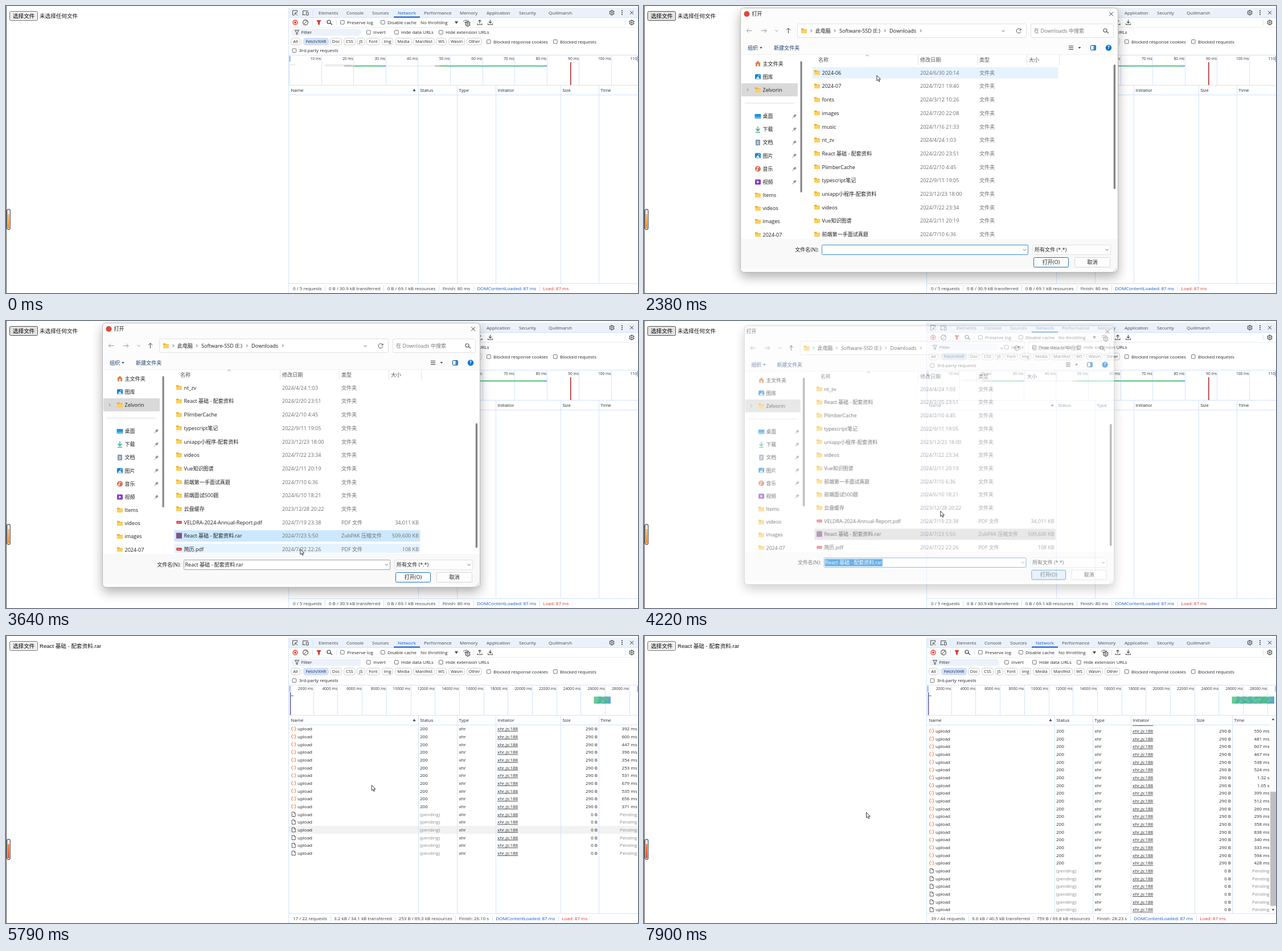
Recreate the animation shown at these times as an HTML page with a canvas. Size 1110 by 505 pixels, loop 7.99 s.

```html
<!DOCTYPE html>
<html lang="zh">
<head>
<meta charset="utf-8">
<style>
html, body { margin: 0; width: 100%; height: 100%; overflow: hidden; background: #fff; }
canvas { display: block; }
</style>
</head>
<body>
<canvas id="stage" width="1110" height="505"></canvas>
<script>
const W = 1110, H = 505, LOOP = 7990;
const UI = '"Open Sans", "Noto Sans CJK SC", "Noto Sans CJK", sans-serif';
const PAGE = '"Liberation Sans", "Noto Sans CJK SC", "Noto Sans CJK", sans-serif';
const stage = document.getElementById('stage').getContext('2d');
const layer = Object.assign(document.createElement('canvas'), { width: W, height: H }).getContext('2d');
let c = stage;

// ---------- drawing helpers ----------
function text(s, x, y, { size = 8, color = '#27282b', align = 'left', font = UI, weight = 400 } = {}) {
  c.font = `${weight} ${size}px ${font}`;
  c.fillStyle = color;
  c.textAlign = align;
  c.fillText(s, x, y + size * 0.36);
  return c.measureText(s).width;
}
function rect(x, y, w, h, color) { c.fillStyle = color; c.fillRect(x, y, w, h); }
function box(x, y, w, h, r, fill, stroke, lw = 1) {
  c.beginPath();
  c.roundRect(x, y, w, h, r);
  if (fill) { c.fillStyle = fill; c.fill(); }
  if (stroke) { c.strokeStyle = stroke; c.lineWidth = lw; c.stroke(); }
}
function circle(x, y, r, fill, stroke, lw = 1) {
  c.beginPath();
  c.arc(x, y, r, 0, Math.PI * 2);
  if (fill) { c.fillStyle = fill; c.fill(); }
  if (stroke) { c.strokeStyle = stroke; c.lineWidth = lw; c.stroke(); }
}
function path(d, x, y, { fill, stroke, lw = 1 } = {}) {
  const p = new Path2D(d);
  c.save();
  c.translate(x, y);
  if (fill) { c.fillStyle = fill; c.fill(p); }
  if (stroke) { c.strokeStyle = stroke; c.lineWidth = lw; c.stroke(p); }
  c.restore();
}
const line = (d, x, y, stroke = '#474747', lw = 1) => path(d, x, y, { stroke, lw });
const solid = (d, x, y, fill = '#474747') => path(d, x, y, { fill });
const vline = (x, y1, y2, color = '#d3e3fd') => rect(x, y1, 1, y2 - y1, color);
const hline = (x1, x2, y, color = '#d3e3fd') => rect(x1, y, x2 - x1, 1, color);
const magnifier = (x, y, col) => line('M2 0A3 3 0 1 1-4 0A3 3 0 1 1 2 0M1.5 2L5 5', x, y - 1, col, 1.1);
const chevron = (x, y, col = '#555') => line('M-2.5-1.2L0 1.2L2.5-1.2', x, y, col, 0.9);

// ---------- upload queue: six requests at a time ----------
const START = 4650, SLOTS = 6, ROW = 13.67, ROWS_TOP = 156.5, ROWS_BOTTOM = 488.3;
const durations = ('392 600 447 396 354 253 531 679 535 656 371 737 621 721 508 550 481 607 467 538 524 ' +
  '1320 1050 399 512 260 299 358 838 340 333 594 428 900 900 900 900 900 900').split(' ').map(Number);
const free = Array(SLOTS).fill(0);
const requests = durations.map(dur => {
  const slot = free.indexOf(Math.min(...free));
  const begin = free[slot];
  free[slot] += dur;
  return { begin, dur, end: begin + dur, slot };
});

// ---------- pointer ----------
const route = [[30, 752, 0], [300, 430, 62], [790, 36, 14], [930, 36, 14], [1320, 410, 95], [2350, 410, 95],
  [2540, 400, 258], [2860, 400, 258], [3000, 401, 336], [3220, 404, 374], [3360, 404, 374], [4130, 712, 448],
  [4219, 712, 448], [4220, 520, 334], [4710, 640, 338], [5690, 640, 338], [5790, 642, 262], [6470, 430, 300],
  [6770, 390, 310]];
function pointer(t) {
  const i = route.findIndex(k => k[0] > t);
  if (i < 0) return route.at(-1).slice(1);
  if (i === 0) return [-50, -50];
  const [t0, x0, y0] = route[i - 1], [t1, x1, y1] = route[i];
  const u = (t - t0) / (t1 - t0);
  return [x0 + (x1 - x0) * u, y0 + (y1 - y0) * u];
}
function drawPointer(t) {
  const [x, y] = pointer(t);
  path('M0 0V9.4L2.2 7.4L3.8 10.8L5.3 10.1L3.8 6.8H6.7Z', x + 0.5, y + 0.5, { fill: '#fff', stroke: '#222', lw: 0.9 });
  if (t >= 1790 && t < 2300) {
    circle(x + 8, y + 0.5, 3.2, '#fff', '#1c86d6', 2.2);
    const a = t / 160;
    c.beginPath();
    c.arc(x + 8, y + 0.5, 3.2, a, a + 1.2);
    c.strokeStyle = '#5fb4ee';
    c.stroke();
  }
}

// ---------- left page ----------
function drawPage(t) {
  rect(0, 0, 1, H, '#5c5c5c');
  const hover = t > 700 && t < 4420, pressed = t >= 900 && t < 1000;
  box(6.5, 9.5, 49, 16, 2, pressed ? '#f5f5f5' : hover ? '#e3e3e3' : '#efefef', hover ? '#4f4f4f' : '#767676');
  text('选择文件', 12, 17.3, { size: 9.6, font: PAGE, color: '#000' });
  text(t < 4420 ? '未选择任何文件' : 'React 基础 - 配套资料.rar', 59, 17.3, { size: 9.6, font: PAGE, color: '#111' });
  box(1.7, 357.7, 5.6, 35.6, 2.8, '#fff', '#555', 1.3);
  const late = t >= 5690;
  const g = c.createLinearGradient(0, 364, 0, 392);
  g.addColorStop(0, late ? '#f0905c' : '#f6c48c');
  g.addColorStop(1, late ? '#ea4a22' : '#ef8a2c');
  rect(3, 366, 3, 25, g);
}

// ---------- network panel ----------
function gear(x, y) {
  circle(x, y, 3.6, null, '#474747', 1.1);
  circle(x, y, 1.3, null, '#474747', 1);
  for (let i = 0; i < 6; i++) {
    const a = i * Math.PI / 3 + Math.PI / 6;
    circle(x + 4.2 * Math.cos(a), y + 4.2 * Math.sin(a), 0.8, '#474747');
  }
}
function check(x, y, label) {
  box(x + 0.5, y - 3.3, 6.6, 6.6, 1, '#fff', '#5f6368', 0.9);
  text(label, x + 12, y);
}
const funnel = (x, y, col, fill) => path('M-3.5-3.5H3.5L1 0V3.5H-1V0Z', x, y, { stroke: col, fill, lw: 1 });

function drawToolbars() {
  rect(497, 3, 613, 17, '#eaf1fb');
  hline(497, W, 20);
  hline(497, W, 37, '#e4ecf9');
  vline(496, 3, H);
  line('M-1 4H-4V-4H4V-1M0 0L4.5 4.5M0 3.5V0H3.5', 507.5, 12);
  line('M-4.5 3.5V-3.5H4.5M-5.5 3.5H0M1.5-1H5V4H1.5Z', 526, 12);
  vline(538, 7, 17);
  const tabs = { Elements: 549, Console: 598, Sources: 643, Network: 688, Performance: 734, Memory: 797,
    Application: 844, Security: 901, Quillmarsh: 953 };
  for (const [name, x] of Object.entries(tabs)) {
    text(name, x, 11.7, { color: name === 'Network' ? '#0b57d0' : '#474747' });
  }
  rect(681, 18.5, 46, 2, '#0b57d0');
  gear(1064, 11.7);
  for (const y of [8.3, 11.5, 14.7]) circle(1082, y, 1, '#333');
  line('M-3-3L3 3M3-3L-3 3', 1099, 11.7, '#333');

  circle(508, 29, 4, null, '#dc362e', 1.3);
  rect(506.3, 27.3, 3.4, 3.4, '#dc362e');
  circle(526, 29, 4.4, null, '#474747', 1.1);
  line('M-3 3L3-3', 526, 29);
  vline(538, 24, 34);
  funnel(549.5, 29, '#dc362e', '#dc362e');
  magnifier(568, 29, '#333');
  vline(580, 24, 34);
  check(587, 28.7, 'Preserve log');
  check(658, 28.7, 'Disable cache');
  text('No throttling', 728, 28.7);
  solid('M-3-2H3L0 2.5Z', 791, 29);
  line('M-5-1.5Q0-5.5 5-1.5M-3 .8Q0-1.8 3 .8', 808, 28.5);
  gear(811, 31.5);
  vline(821, 24, 34);
  line('M0 2V-4M-2.5-1.5L0-4L2.5-1.5M-4 2V4H4V2', 832, 28.7, '#474747', 1.1);
  line('M0-4.5V1.5M-2.5-1L0 1.5L2.5-1M-4 2V4H4V2', 850.5, 28.7, '#474747', 1.1);
  vline(1087, 24, 34);
  gear(1099, 29);

  box(501, 40, 123, 12.5, 6, '#edf2fa');
  funnel(511, 46.3, '#474747');
  text('Filter', 518.5, 46.3);
  check(633, 46.2, 'Invert');
  check(682, 46.2, 'Hide data URLs');
  check(760, 46.2, 'Hide extension URLs');

  const chips = { All: [500, 517], 'Fetch/XHR': [522, 567], Doc: [569, 590], CSS: [593, 614], JS: [616, 631],
    Font: [633, 657], Img: [660, 680], Media: [683, 713], Manifest: [715, 753], WS: [755, 774],
    Wasm: [777, 806], Other: [809, 836] };
  for (const [name, [a, b]] of Object.entries(chips)) {
    const on = name === 'Fetch/XHR';
    box(a + 0.5, 56.5, b - a - 1, 12, 4, on ? '#d3e3fd' : '#fff', on ? '#c4d9fb' : '#c7c7c7', 0.9);
    text(name, (a + b) / 2, 62.7, { size: 7.4, align: 'center', weight: 500 });
  }
  vline(519, 58, 68);
  check(844, 62.7, 'Blocked response cookies');
  check(961, 62.7, 'Blocked requests');
  check(502.5, 78.3, '3rd-party requests');
}

function drawOverview(t) {
  const live = t >= START;
  hline(497, W, 86);
  hline(497, W, 139);
  const pitch = live ? 42.7 : 56.6, unit = live ? 2000 : 10;
  for (let i = 0; i < 15; i++) {
    const x = 497.5 + i * pitch;
    vline(Math.round(x - 0.5), 87, 139);
    if (i) text(`${i * unit} ms`, x - 1, 93, { size: 6.7, align: 'right', color: '#333' });
  }
  rect(497, 88, 3, 10, '#a8c7fa');
  rect(1108, 88, 2, 10, '#a8c7fa');
  if (!live) {
    rect(499, 103, 9, 1, '#dcdcdc');
    rect(560, 103, 47, 1, '#dcdcdc');
    rect(560, 105, 193, 1, '#dedede');
    rect(594, 104.5, 18, 2, '#b3b3b3');
    rect(612, 104.5, 49, 2, '#4cc27a');
    rect(661, 104.5, 6, 2, '#5b9bf0');
    rect(753, 104.5, 8, 2, '#b3b3b3');
    rect(761, 104.5, 183, 2, '#4cc27a');
    rect(944, 104.5, 6, 2, '#5b9bf0');
    rect(991, 99, 1.6, 40, '#ab2a30');
    return;
  }
  rect(499, 104.5, 6, 1.5, '#6aa4ee');
  rect(499, 99, 1.3, 40, '#4a4a8c');
  const now = t - START, px = ms => 1032.5 + ms * 0.02135;
  for (const r of requests) {
    if (r.begin > now) continue;
    const a = px(r.begin), b = px(Math.min(r.end, now)) + 5;
    const y = 106.8 + r.slot * 2.05;
    rect(a, y, b - a, 1.7, '#45bf7c');
    rect(a + (b - a) * 0.55, y, (b - a) * 0.45, 1.7, '#5a98e6');
  }
}

function drawTable(t) {
  const now = t - START;
  const shown = requests.filter(r => r.begin <= now);
  const total = shown.length * ROW, view = ROWS_BOTTOM - ROWS_TOP;
  const bar = total > view;
  const cols = bar ? [497, 721, 788, 855, 967, 1033, 1100] : [497, 724, 792, 860, 974, 1041, 1110];
  const scroll = Math.max(0, total - view);
  const [mx, my] = pointer(t - 130);

  c.save();
  c.beginPath();
  c.rect(497, 157, 613, 331);
  c.clip();
  shown.forEach((r, i) => {
    const top = ROWS_TOP + i * ROW - scroll, y = top + ROW / 2;
    if (top < 140) return;
    const done = r.end <= now, tone = { color: done ? '#27282b' : '#8a8a8a' };
    if (mx > 497 && my >= top && my < top + ROW) rect(497, top, cols[6] - 497, ROW, '#f2f2f2');
    if (done) {
      line('M-1.5-3.5Q-3-3.5-3-2Q-3 0-4 0Q-3 0-3 2Q-3 3.5-1.5 3.5M1.5-3.5Q3-3.5 3-2Q3 0 4 0Q3 0 3 2Q3 3.5 1.5 3.5M0-2V-1M0 1V2',
        505.2, y, '#e8703a', 1);
    } else {
      line('M-3-3.8H1L3-1.8V3.8H-3ZM1-3.8V-1.8H3', 505.2, y, '#474747', 0.9);
    }
    text('upload', 512, y);
    text(done ? '200' : '(pending)', cols[1] + 3, y, tone);
    text('xhr', cols[2] + 3.5, y);
    const w = text('xhr.js:188', cols[3] + 3, y);
    rect(cols[3] + 3, y + 4, w, 0.8, '#27282b');
    text(done ? '290 B' : '0 B', cols[5] - 2, y, { align: 'right' });
    const time = r.dur < 1000 ? `${r.dur} ms` : `${(r.dur / 1000).toFixed(2)} s`;
    text(done ? time : 'Pending', cols[6] - 1.5, y, { ...tone, align: 'right' });
  });
  c.restore();

  ['Name', 'Status', 'Type', 'Initiator', 'Size', 'Time'].forEach((name, i) => {
    text(name, cols[i] + 3.2, 148);
    if (i) vline(cols[i], 139, 488);
  });
  solid('M-2.5 2L0-2.5L2.5 2Z', cols[1] - 7, 148);
  hline(497, W, 156);
  if (bar) {
    rect(1100, 140, 10, 348, '#fafafa');
    const len = 323 * view / total;
    rect(1100, 475 - len, 10, len, '#bfbfbf');
    solid('M-2.5 1.5L0-1.5L2.5 1.5Z', 1105, 146.5);
    solid('M-2.5-1.5L0 1.5L2.5-1.5Z', 1105, 482);
  }
  drawStatus(t, shown, now);
}

function drawStatus(t, shown, now) {
  hline(497, W, 488);
  const done = shown.filter(r => r.end <= now);
  const n = done.length, bytes = n * 290;
  const last = Math.max(0, ...done.map(r => r.end));
  const sent = bytes < 1000 ? `${bytes} B` : `${(bytes / 1000).toFixed(1)} kB`;
  const parts = [
    [`${shown.length} / ${shown.length + 5} requests`],
    [`${sent} / ${(30.93 + bytes / 1000).toFixed(1)} kB transferred`],
    [`${n * 23} B / ${(69.05 + n * 0.023 + 0.001).toFixed(1)} kB resources`],
    [`Finish: ${t < START ? '80 ms' : (25.05 + last / 1000).toFixed(2) + ' s'}`],
    ['DOMContentLoaded: 87 ms', '#0b57d0'],
    ['Load: 87 ms', '#dc362e']];
  let x = 504;
  parts.forEach(([s, color = '#3a3c40'], i) => {
    x += text(s, x, 496.7, { color }) + 12.3;
    if (i < 5) vline(Math.round(x - 6.5), 492, 502);
  });
}

// ---------- file dialog ----------
const DIR = '文件夹', LINE = 23.7, RAR = 'React 基础 - 配套资料.rar';
const files = [
  ['2024-06', '2024/6/30 20:14', DIR], ['2024-07', '2024/7/21 19:40', DIR], ['fonts', '2024/3/12 10:26', DIR],
  ['images', '2024/7/20 22:08', DIR], ['music', '2024/1/16 21:33', DIR],
  ['nt_zv', '2024/4/24 1:03', DIR], ['React 基础 - 配套资料', '2024/2/20 23:51', DIR],
  ['PlimberCache', '2024/2/10 4:45', DIR], ['typescript笔记', '2022/9/11 19:05', DIR],
  ['uniapp小程序-配套资料', '2023/12/23 18:00', DIR], ['videos', '2024/7/22 23:34', DIR],
  ['Vue知识图谱', '2024/2/11 20:19', DIR], ['前端第一手面试真题', '2024/7/10 6:36', DIR],
  ['前端面试500题', '2024/6/10 18:21', DIR], ['云盘缓存', '2023/12/28 20:22', DIR],
  ['VELDRA-2024-Annual-Report.pdf', '2024/7/19 23:38', 'PDF 文件', '34,011 KB'],
  [RAR, '2024/7/23 5:50', 'ZubPAK 压缩文件', '509,600 KB'],
  ['简历.pdf', '2024/7/22 22:26', 'PDF 文件', '108 KB']];
const say = (s, x, y, o = {}) => text(s, x, y, { size: 9.05, color: '#1f1f1f', ...o });

function folder(x, y) {
  solid('M-5-4H-1L0-2.5H5V4H-5Z', x, y, '#e9a820');
  box(x - 5, y - 1.8, 10, 6, 0.8, '#fdd05a');
}
function sideIcon(name, x, y) {
  switch (name) {
    case '主文件夹': solid('M-5 0L0-5L5 0H4V5H1V1H-1V5H-4V0Z', x, y, '#d98452'); break;
    case '图库': case '图片':
      box(x - 5, y - 4.5, 10, 9, 1.5, '#1b7fd0');
      solid('M-4 4L0-1L4 4Z', x, y, '#d5efff');
      circle(x + 2, y - 2, 1, '#fff');
      break;
    case '桌面': box(x - 5.5, y - 4, 11, 8, 1, '#2693d8'); rect(x - 5, y + 1.5, 10, 1.5, '#7ad3f5'); break;
    case '下载': line('M0-5V2.5M-3.5-1L0 2.5L3.5-1M-4 5H4', x, y, '#23a07c', 1.3); break;
    case '文档': box(x - 4, y - 5, 8, 10, 1, '#7f95b3'); for (const k of [-2, 0, 2]) rect(x - 2, y + k, 4, 0.9, '#fff'); break;
    case '音乐': circle(x, y, 5, '#dd6b4c'); line('M-1 2V-3L2-2', x, y, '#fff'); circle(x - 1.6, y + 2, 1.2, '#fff'); break;
    case '视频': box(x - 5, y - 4.5, 10, 9, 1, '#7f3fbf'); solid('M-1.5-2.5L2.5 0L-1.5 2.5Z', x, y, '#fff'); break;
    default: folder(x, y);
  }
}
function fileIcon(name, x, y) {
  if (name.endsWith('.pdf')) {
    box(x - 4.7, y - 2.3, 9.4, 5, 1, '#d93840');
    rect(x - 3, y - 0.2, 6, 0.9, '#f6c5c7');
  } else if (name.endsWith('.rar')) rect(x - 5, y - 5, 10, 10, '#84508c');
  else folder(x, y);
}

function drawDialogTop(closing) {
  if (!closing) circle(180.5, 14, 5, '#e0483b');
  say('打开', closing ? 173 : 189.5, 14);
  line('M-3.5-3.5L3.5 3.5M3.5-3.5L-3.5 3.5', 820.5, 14, '#222', 0.9);
  line('M4.5 0H-4.5M-1-3.5L-4.5 0L-1 3.5', 185, 43.5, '#999');
  line('M-4.5 0H4.5M1-3.5L4.5 0L1 3.5', 210.5, 43.5, '#999');
  chevron(233, 43.5, '#888');
  line('M0 4.5V-4.5M-3.5-1L0-4.5L3.5-1', 253.5, 43.5, '#444');
  box(269.5, 31.5, 402, 24, 2, '#fff', '#e0e0e0');
  folder(281, 43.5);
  const crumb = x => line('M-1-2.2L1.2 0L-1 2.2', x, 43.5, '#444');
  [293.5, 335, 423, 486].forEach(crumb);
  say('此电脑', 301, 43.5);
  say('Software-SSD (E:)', 343, 43.5);
  say('Downloads', 431, 43.5);
  chevron(631, 44);
  line('M3.8-1.5A4 4 0 1 0 4 1M4-4V-1.3H1.3', 658, 43.7, '#555');
  box(679.5, 31.5, 145, 24, 2, '#fff', '#e0e0e0');
  say('在 Downloads 中搜索', 685, 43.5, { color: '#777' });
  magnifier(811, 44, '#555');

  say('组织', 182, 73.5, { color: '#1c3e6e' });
  solid('M-2.3-1.2H2.3L0 1.5Z', 205.5, 73.5, '#1c3e6e');
  say('新建文件夹', 228, 73.5, { color: '#1c3e6e' });
  for (const y of [70.5, 73.5, 76.5]) rect(746, y - 0.5, 8, 1, '#333');
  solid('M-2.3-1.2H2.3L0 1.5Z', 765, 73.5, '#333');
  box(784.5, 69.5, 9, 8, 1, '#fff', '#123f7a');
  rect(789.5, 70, 4, 7, '#2b8fe0');
  circle(816, 73.5, 5.2, '#0b74cc');
  say('?', 816, 73.5, { size: 8, color: '#fff', align: 'center', weight: 700 });
}

function drawSidebar() {
  c.save();
  c.beginPath();
  c.rect(170, 86, 112, 320);
  c.clip();
  box(171, 136, 99, 23, 1, '#d9d9d9');
  line('M-1-2.3L1.3 0L-1 2.3', 182, 147.5, '#777');
  hline(177, 264, 170.5, '#dedede');
  ['主文件夹', '图库', 'Zelvorin', null, '桌面', '下载', '文档', '图片', '音乐', '视频', 'Items', 'videos', 'images', '2024-07']
    .forEach((name, i) => {
      if (!name) return;
      const y = 101.3 + i * 23.15;
      sideIcon(name, 200, y);
      say(name, 208.5, y);
      if (i > 3 && i < 10) solid('M1-4L4-1L2.5-.5L1 2L-.5 1L-3.5 4L-4 3.5L-1 .5L-2-1L.5-2.5Z', 264, y, '#8b9198');
    });
  box(274.5, 97, 3.2, 231, 1.5, '#878787');
  c.restore();
}

function drawFileList(t, closing) {
  const scroll = (t < 2620 ? 0 : t < 2670 ? 2.5 : 5) * LINE;
  const [mx, my] = pointer(t);
  const selected = t >= 3220;
  c.save();
  c.beginPath();
  c.rect(283, 104, 548, 304);
  c.clip();
  files.forEach(([name, date, type, size], i) => {
    const y = 117.5 + i * LINE - scroll;
    const over = !closing && mx > 295 && mx < 727 && my > 104 && my < 408 && Math.abs(my - y) < LINE / 2;
    const picked = selected && name === RAR;
    if (picked || over) rect(295.5, y - 10, 432, 20, picked ? (t < 4130 ? '#cce8ff' : '#d9d9d9') : '#e5f3ff');
    const grey = { color: '#6d6d6d' };
    fileIcon(name, 304, y - 0.5);
    say(name, 312.5, y);
    say(date, 485, y, grey);
    say(type, 589, y, grey);
    if (size) say(size, 725, y, { ...grey, align: 'right' });
  });
  c.restore();
  [['名称', 306], ['修改日期', 485], ['类型', 589], ['大小', 676]].forEach(([s, x]) => say(s, x, 94.5, { color: '#555' }));
  for (const x of [481, 585, 672, 729]) vline(x, 86, 104, '#e3e3e3');
  line('M-2.5 1.2L0-1.2L2.5 1.2', 392, 87, '#777', 0.8);
  box(824.7, 180 - (118.5 - scroll) * 0.65, 3.4, 219, 1.5, '#858585');
}

function drawDialogBottom(t) {
  rect(170, 410, 662, 52, '#f9f9f9');
  say('文件名(N):', 307, 429, { align: 'right' });
  box(312.5, 420.5, 362, 17, 1, '#fff', t < 3220 || t >= 4130 ? '#3c8fd0' : '#a0a0a0');
  if (t >= 3220) {
    const focused = t >= 4130;
    c.font = `9.05px ${UI}`;
    if (focused) rect(314, 422.5, c.measureText(RAR).width + 1, 13, '#0078d7');
    say(RAR, 314.5, 429, { color: focused ? '#fff' : '#1f1f1f' });
  }
  chevron(668.5, 429);
  box(682.5, 420.5, 137, 17, 1, '#fdfdfd', '#e2e2e2');
  say('所有文件 (*.*)', 686, 429);
  chevron(813, 429);
  const [mx, my] = pointer(t);
  const hot = t >= 4130 || (mx > 684 && my > 442);
  box(684.5, 442.5, 61, 17, 2, hot ? '#d9ebf9' : '#fdfdfd', '#1a74bd');
  say('打开(O)', 715, 451, { align: 'center' });
  box(756.5, 442.5, 62, 17, 2, '#fdfdfd', '#d6d6d6');
  say('取消', 787.5, 451, { align: 'center' });
  for (let i = 0; i < 3; i++) for (let j = 0; j <= i; j++) rect(829 - j * 2.5, 461 + i * 2.5, 1.2, 1.2, '#aaa');
}

function drawDialog(t) {
  const closing = t >= 4220;
  const p = closing ? 0.4 + (t - 4220) / 150 : 1 - (t - 2050) / 220;
  if (p >= 1) return;
  const hidden = Math.max(0, p);
  c = layer;
  c.clearRect(0, 0, W, H);
  c.save();
  c.shadowColor = 'rgba(0,0,0,.32)';
  c.shadowBlur = 20;
  c.shadowOffsetY = 8;
  box(169.5, 3.5, 663, 465, 6, '#fcfcfc');
  c.restore();
  box(169.5, 3.5, 663, 465, 6, '#fcfcfc', '#a9a9a9', 0.8);
  rect(170, 85, 662, 325, '#fff');
  hline(170, 832, 85, '#f0f0f0');
  drawDialogTop(closing);
  drawSidebar();
  drawFileList(t, closing);
  drawDialogBottom(t);
  c = stage;
  c.save();
  c.globalAlpha = 1 - hidden;
  c.translate(501, 236);
  c.scale(1 - hidden * 0.05, 1 - hidden * 0.05);
  c.drawImage(layer.canvas, -501, -236);
  c.restore();
}

function frame(ms) {
  const t = ms % LOOP;
  rect(0, 0, W, H, '#fff');
  drawPage(t);
  drawToolbars();
  drawOverview(t);
  drawTable(t);
  if (t >= 2050 && t < 4320) drawDialog(t);
  drawPointer(t);
}

const origin = performance.now();
function tick() {
  frame(performance.now() - origin);
  requestAnimationFrame(tick);
}
tick();
</script>
</body>
</html>
```
